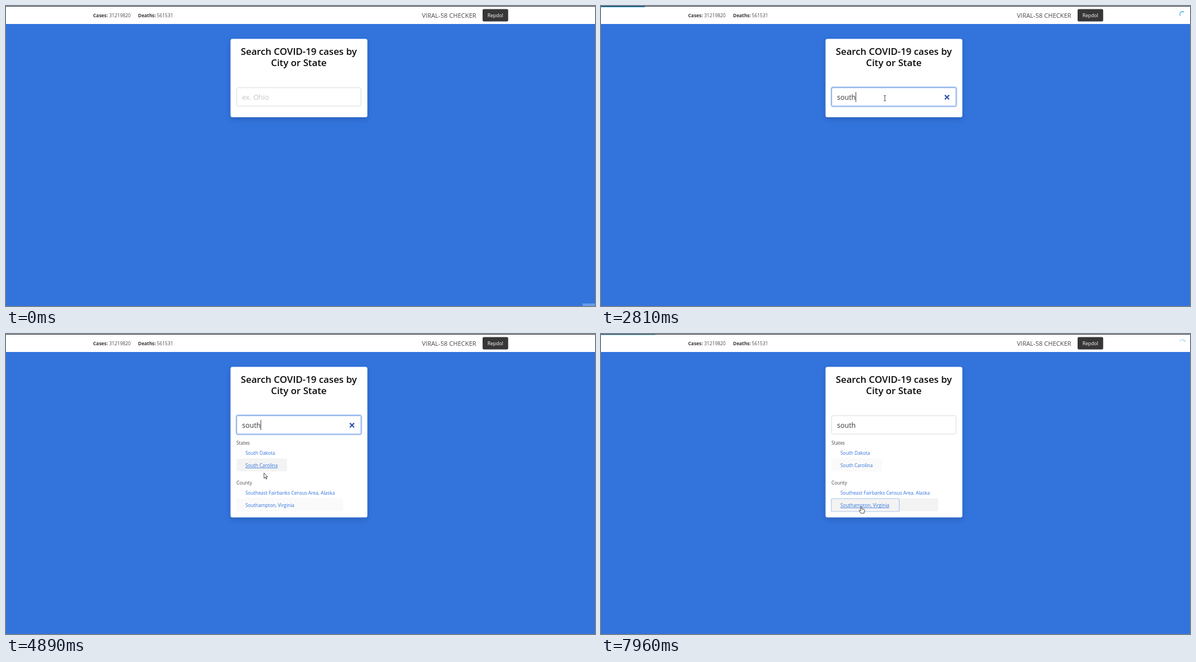
Animation of 1048 by 534 pixels, one loop 7.99 s. Source, as an HTML page with a canvas:

```html
<!DOCTYPE html>
<html lang="en">
<head>
<meta charset="utf-8">
<title>Case search</title>
<style>
  html, body { margin: 0; width: 100%; height: 100%; overflow: hidden; background: #3273dc; }
  canvas { display: block; }
</style>
</head>
<body>
<canvas id="stage" width="1048" height="534"></canvas>
<script>
const ctx = document.getElementById('stage').getContext('2d');
const LOOP = 7990, WIDTH = 1048;
const BLUE = '#3273dc', ACCENT = '#2299dd';

const FOCUS = 1070, RESULTS = 3430, CLICK = 5850;
const TYPED = [1950, 2010, 2240, 2440, 2655];
const SPIN_PERIOD = 375;

// Time, x, y of the pointer tip
const POINTER = [
  [20, 1048, 534], [200, 930, 440], [400, 705, 270], [560, 560, 162], [660, 517, 139],
  [810, 505, 162], [900, 505, 164], [4320, 505, 164], [4600, 478, 208], [4800, 462, 235],
  [4890, 459, 247], [4980, 460, 266], [5150, 462, 288], [5340, 463, 307]
];

// Time, width of the loading bar as set; each change eases over 200 ms
const LOADS = [
  { start: 2440, end: 3750, spin: 0, at: 2810, steps: [[2440, 78], [3240, 81], [3550, WIDTH]] },
  { start: 6030, end: LOOP, spin: -45, at: 6740, steps: [[6030, 78], [6830, 88], [7630, 96]] }
];

const ROWS = [
  { text: 'South Dakota', y: 211, width: 90, link: 87 },
  { text: 'South Carolina', y: 233.5, width: 90, link: 90, striped: true },
  { text: 'Southeast Fairbanks Census Area, Alaska', y: 282, width: 190, link: 190 },
  { text: 'Southampton, Virginia', y: 304.5, width: 190, link: 121, striped: true }
];

const clamp = v => Math.max(0, Math.min(1, v));
const ease = v => { v = clamp(v); return v * v * (3 - 2 * v); };

function text(str, x, y, size, color, weight = 400, align = 'left') {
  ctx.font = `${weight} ${size}px "Open Sans", "Noto Sans", sans-serif`;
  ctx.textAlign = align;
  ctx.fillStyle = color;
  ctx.fillText(str, x, y);
  return ctx.measureText(str).width;
}

function rect(x, y, w, h, color) {
  ctx.fillStyle = color;
  ctx.fillRect(x, y, w, h);
}

function roundRect(x, y, w, h, r, fill, stroke, lineWidth = 1) {
  ctx.beginPath();
  ctx.roundRect(x, y, w, h, r);
  if (fill) { ctx.fillStyle = fill; ctx.fill(); }
  if (stroke) { ctx.strokeStyle = stroke; ctx.lineWidth = lineWidth; ctx.stroke(); }
}

function pointerAt(t) {
  const i = POINTER.findIndex(p => p[0] > t);
  if (i < 0) return POINTER.at(-1).slice(1);
  if (i === 0) return [WIDTH + 20, 560];
  const [t0, x0, y0] = POINTER[i - 1], [t1, x1, y1] = POINTER[i];
  const k = (t - t0) / (t1 - t0);
  return [x0 + (x1 - x0) * k, y0 + (y1 - y0) * k];
}

const overRow = ([x, y], row) => x > 410 && x < 410 + row.link && Math.abs(y - row.y) < 11.5;
const overInput = ([x, y]) => x > 410 && x < 632 && y > 145 && y < 179;

function navbar() {
  rect(0, 0, WIDTH, 32, '#fff');
  rect(0, 0, WIDTH, 1, '#2b2e33');
  text('Cases:', 155, 20, 8.4, '#363636', 700);
  text('31219820', 183.5, 20, 8.4, '#4a4a4a');
  text('Deaths:', 235, 20, 8.3, '#363636', 700);
  text('561531', 268.5, 20, 8.4, '#4a4a4a');
  text('VIRAL-58 CHECKER', 740, 21, 11.1, '#4a4a4a');
  roundRect(848, 5.5, 45.5, 22, 2.3, '#363636');
  text('Repdol', 870.6, 20, 8.5, '#fff', 500, 'center');
}

function card(t) {
  ctx.save();
  ctx.shadowColor = 'rgba(10,10,10,.14)';
  ctx.shadowBlur = 10;
  ctx.shadowOffsetY = 4;
  roundRect(399.5, 58.5, 243.5, t < RESULTS ? 139.5 : 268, 3.5, '#fff');
  ctx.restore();
  text('Search COVID-19 cases by', 521, 87, 16.8, '#0a0a0a', 600, 'center');
  text('City or State', 521, 107, 16.8, '#0a0a0a', 600, 'center');
}

function searchField(t) {
  const focused = t >= FOCUS && t < CLICK;
  const hovered = overInput(pointerAt(t));
  if (focused) roundRect(409.7, 144.4, 222.8, 34.6, 3, null, 'rgba(50,115,220,.3)', 2.6);
  roundRect(410.5, 145.5, 221.2, 32.6, 2.2, '#fff',
    focused ? '#6d9be6' : hovered ? '#b5b5b5' : '#dbdbdb');

  const count = TYPED.filter(time => t >= time).length;
  let width = 0;
  if (count) width = text('south'.slice(0, count), 420, 167, 12.5, '#363636');
  else text('ex. Ohio', 420, 167, 12.5, '#c6c6c6');

  if (!focused) return;
  if (count) {
    ctx.strokeStyle = '#3056a8';
    ctx.lineWidth = 2.2;
    ctx.beginPath();
    ctx.moveTo(611.8, 158.6); ctx.lineTo(619.4, 166.2);
    ctx.moveTo(619.4, 158.6); ctx.lineTo(611.8, 166.2);
    ctx.stroke();
  }
  const lastInput = count ? TYPED[count - 1] : FOCUS;
  if ((t - lastInput) % 1000 < 500) rect(Math.round(420 + width), 153, 1, 18, '#444');
}

function results(t) {
  if (t < RESULTS) return;
  text('States', 410, 197, 8.4, '#4a4a4a');
  text('County', 410, 268, 8.4, '#4a4a4a');
  const pointer = pointerAt(t - 30);
  for (const row of ROWS) {
    const hovered = overRow(pointer, row);
    const active = t >= CLICK && row === ROWS[3];
    if (row.striped || hovered)
      rect(410.5, row.y - 11.5, row.width - .5, 22.5, hovered ? '#f3f3f3' : '#fafafa');
    if (!row.striped) rect(420, row.y + 10.7, row.width - 22, .6, '#e6e6e6');
    if (active) roundRect(409.8, 293, 120.8, 23, 2, null, '#a9c5f0', 1.2);
    const width = text(row.text, 426, Math.round(row.y + 3.6), 8.4, BLUE);
    if (hovered) rect(426, Math.round(row.y + 4.6), width, .8, BLUE);
  }
}

function loader(t) {
  const load = LOADS.find(l => t >= l.start && t < l.end);
  if (!load) return;
  let width = 0;
  for (const [time, target] of load.steps)
    if (t >= time) width += (target - width) * ease((t - time) / 200);
  ctx.globalAlpha = clamp((load.end - t) / 60);
  rect(0, 1, width, 1.2, ACCENT);

  ctx.save();
  ctx.translate(1034.6, 14.6);
  ctx.rotate((load.spin + (t - load.at) / SPIN_PERIOD * 360) * Math.PI / 180);
  ctx.strokeStyle = ACCENT;
  ctx.lineWidth = 1.2;
  ctx.beginPath();
  ctx.arc(0, 0, 4.6, Math.PI * .8, Math.PI * 1.7);
  ctx.stroke();
  ctx.restore();
  ctx.globalAlpha = 1;
}

const ARROW = new Path2D('M0 0V9.6L2.2 7.6L3.7 11L5.2 10.4L3.7 7.1H6.6Z');
const HAND = new Path2D('M-1 .9Q0-.4 1 .9V4.4L5.4 5.6Q6.2 6 6 7.2L5 12H-.6L-3.6 7.8Q-3.8 6.4-2.4 6.8L-1 8Z');
const BEAM = new Path2D('M-2-4.5H-.6L0-4L.6-4.5H2M0-4V4.2M-2 4.8H-.6L0 4.2L.6 4.8H2');

function cursor(t) {
  const point = pointerAt(t);
  ctx.save();
  ctx.translate(...point);
  if (overInput(point)) {
    ctx.strokeStyle = '#444';
    ctx.lineWidth = 1;
    ctx.stroke(BEAM);
  } else {
    const shape = t > RESULTS && ROWS.some(row => overRow(point, row)) ? HAND : ARROW;
    ctx.fillStyle = '#fff';
    ctx.fill(shape);
    ctx.strokeStyle = '#333';
    ctx.lineWidth = .9;
    ctx.stroke(shape);
  }
  ctx.restore();
}

function draw(t) {
  rect(0, 0, WIDTH, 534, BLUE);
  if (t < 20) rect(1026, 529.5, 22, 4.5, '#6a9be6');
  navbar();
  card(t);
  searchField(t);
  results(t);
  loader(t);
  cursor(t);
}

const origin = performance.now();
function tick() {
  draw((performance.now() - origin) % LOOP);
  requestAnimationFrame(tick);
}
tick();
</script>
</body>
</html>
```
